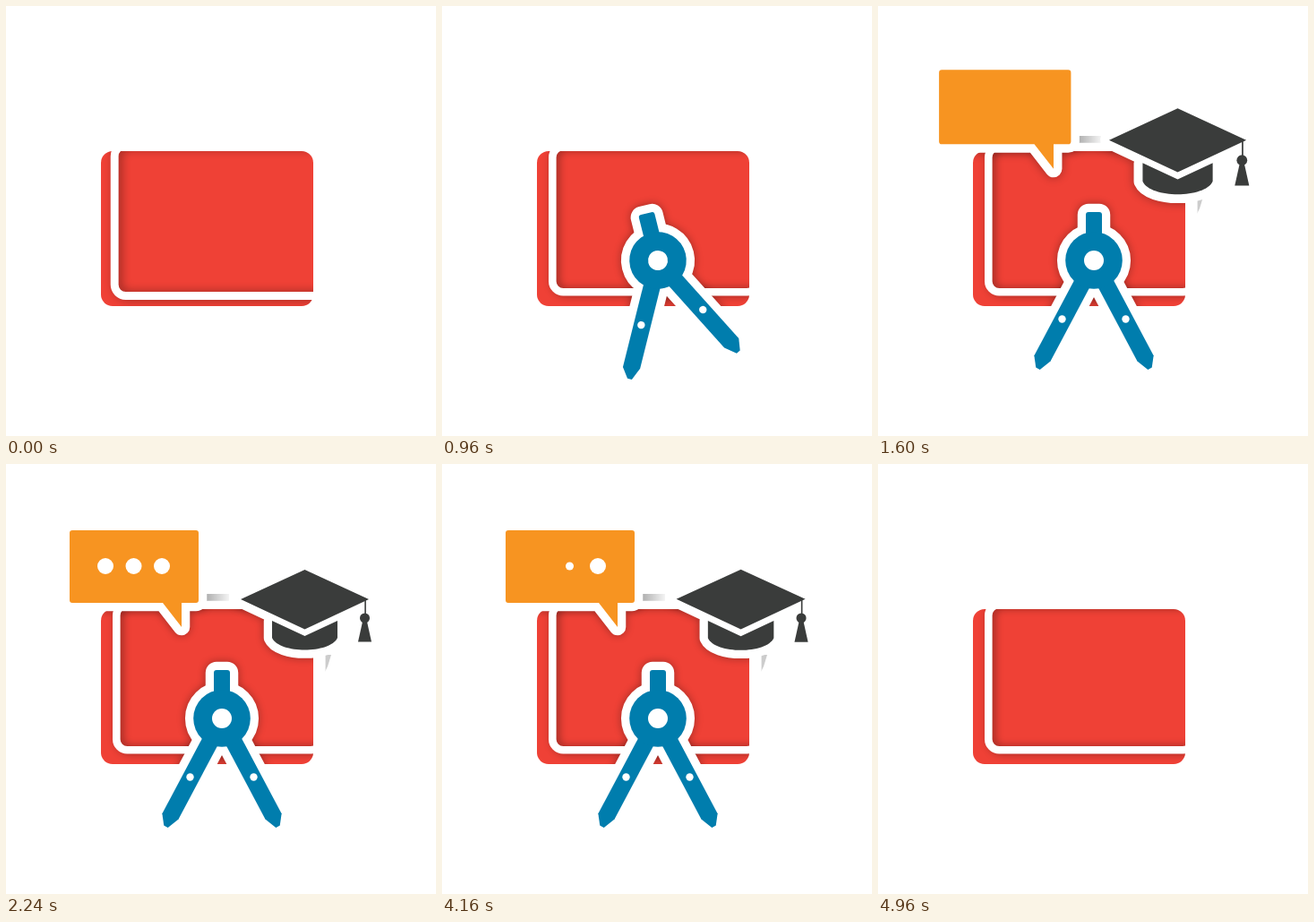
An HTML page for the animation above (5.28 s loop, 480 by 480 pixels).

```html
<!DOCTYPE html>
<html lang="en">
<head>
<meta charset="utf-8">
<title>Learning icons</title>
<style>
  html, body { margin: 0; width: 100%; height: 100%; overflow: hidden; background: #fff; }
  svg { display: block; width: 100vw; height: 100vh; }
  .halo { fill: #fff; stroke: #fff; stroke-width: 18.5; stroke-linejoin: round; }
  .shade { fill: #000; stroke: #000; stroke-width: 18.5; stroke-linejoin: round; opacity: .34; }
  .line { fill: none; stroke-width: 8.6; }
</style>
</head>
<body>
<svg viewBox="0 0 480 480">
  <defs>
    <clipPath id="cardClip"><rect x="106" y="162" width="237" height="173" rx="13"/></clipPath>
    <filter id="blur" x="-30%" y="-30%" width="160%" height="160%"><feGaussianBlur stdDeviation="5"/></filter>
    <linearGradient id="edge">
      <stop offset="0" stop-color="#aaa"/>
      <stop offset="1" stop-color="#f4f4f4"/>
    </linearGradient>

    <rect id="frame" x="123.3" y="157" width="229" height="162.3" rx="12"/>

    <path id="leg" d="M-9 20V125L-1 136H4L10 122V20Z"/>
    <g id="compass">
      <rect x="-9" y="-54" width="18" height="34" rx="3"/>
      <use href="#leg" transform="rotate(28)"/>
      <use href="#leg" transform="scale(-1 1) rotate(28)"/>
      <circle r="31.8"/>
    </g>

    <path id="bubble" d="M74 74H212Q215 74 215 77V152Q215 155 212 155H196V182L175 155H74Q71 155 71 152V77Q71 74 74 74Z"/>

    <g id="cap">
      <path d="M262 151L333.5 118L405 151L333.5 184.500Z"/>
      <path d="M297 175L333.500 192L370 175V194C362 212 305 212 297 194Z"/>
      <rect x="400.300" y="151" width="1.600" height="20"/>
      <circle cx="400.500" cy="172" r="5.500"/>
      <path d="M398 176H403L408 198.500H393Z"/>
    </g>
  </defs>

  <rect width="480" height="480" fill="#fff"/>
  <rect x="106" y="162" width="237" height="173" rx="13" fill="#ef4136"/>

  <g clip-path="url(#cardClip)">
    <g class="frame"><use href="#frame" class="line" stroke="#000" opacity=".36" x="3" filter="url(#blur)"/></g>
    <g class="compass"><use href="#compass" class="shade" filter="url(#blur)"/></g>
    <g class="bubble"><use href="#bubble" class="shade" filter="url(#blur)"/></g>
    <g class="cap"><use href="#cap" class="shade" filter="url(#blur)"/></g>
  </g>

  <g id="edges">
    <rect x="222" y="145" width="27" height="8" fill="url(#edge)"/>
    <path d="M353 213H363L359 226L355 234Z" fill="#ccc"/>
  </g>

  <g class="frame"><use href="#frame" class="line" stroke="#fff"/></g>

  <g class="compass">
    <use href="#compass" class="halo"/>
    <use href="#compass" fill="#007dad"/>
    <g fill="#fff">
      <circle r="11"/>
      <circle cx="-35.500" cy="65.500" r="4.200"/>
      <circle cx="35.500" cy="65.500" r="4.200"/>
    </g>
  </g>

  <g class="bubble">
    <use href="#bubble" class="halo"/>
    <use href="#bubble" fill="#f79421"/>
    <g id="dots" fill="#fff">
      <circle cx="111" cy="114"/>
      <circle cx="142.500" cy="114"/>
      <circle cx="174" cy="114"/>
    </g>
  </g>

  <g class="cap">
    <use href="#cap" class="halo"/>
    <use href="#cap" fill="#3a3c3b"/>
  </g>
</svg>
<script>
  const LOOP = 5280, STEP = 80;
  const all = name => document.querySelectorAll('.' + name);
  const parts = { frame: all('frame'), compass: all('compass'), bubble: all('bubble'), cap: all('cap') };
  const dots = [...document.querySelectorAll('#dots circle')];
  const edges = document.getElementById('edges');

  const phase = (t, start, length) => Math.min(1, Math.max(0, (t - start) / length));
  const smooth = p => p * p * (3 - 2 * p);
  const backOut = p => 1 + (p - 1) ** 2 * (2.7 * (p - 1) + 1.7);
  const backIn = p => p * p * (3.1 * p - 2.1);

  function place(name, transform, visible) {
    for (const el of parts[name]) {
      el.setAttribute('transform', transform);
      el.style.display = visible ? '' : 'none';
    }
  }

  const scaleAt = (x, y, s) => `translate(${x} ${y}) scale(${s}) translate(${-x} ${-y})`;

  function pop(name, x, y, t, inAt, inLength, outAt, outLength) {
    const s = t < outAt
      ? backOut(phase(t, inAt, inLength))
      : 1 - backIn(phase(t, outAt, outLength));
    place(name, scaleAt(x, y, s), s > 0.001);
  }

  function dotSize(t, i) {
    const at = start => smooth(phase(t, start + i * 160, 240));
    return at(1585) - at(2370) + at(3095) - at(3880);
  }

  function draw(t) {
    const pulse = t < 560 ? 0.07 * Math.sin(Math.PI * (t + 120) / 680) : 0;
    place('frame', scaleAt(181, 205, 1 + pulse), true);

    const grow = 1 - (1 - phase(t, 640, 260)) ** 3;
    const size = grow * (1 - phase(t, 4540, 400) ** 3);
    const turn = -76 * (1 - phase(t, 640, 560)) ** 2;
    place('compass', `translate(241 284) rotate(${turn}) scale(${size})`, size > 0.001);

    pop('bubble', 197, 190, t, 1200, 460, 4210, 360);
    pop('cap', 319, 170, t, 1250, 480, 4140, 340);
    dots.forEach((dot, i) => dot.setAttribute('r', Math.max(0, 9 * dotSize(t, i))));
    edges.style.display = t >= 1360 && t < 4480 ? '' : 'none';
  }

  const begin = performance.now();
  function tick() {
    const t = (performance.now() - begin) % LOOP;
    draw(Math.floor(t / STEP) * STEP);
    requestAnimationFrame(tick);
  }
  tick();
</script>
</body>
</html>
```
